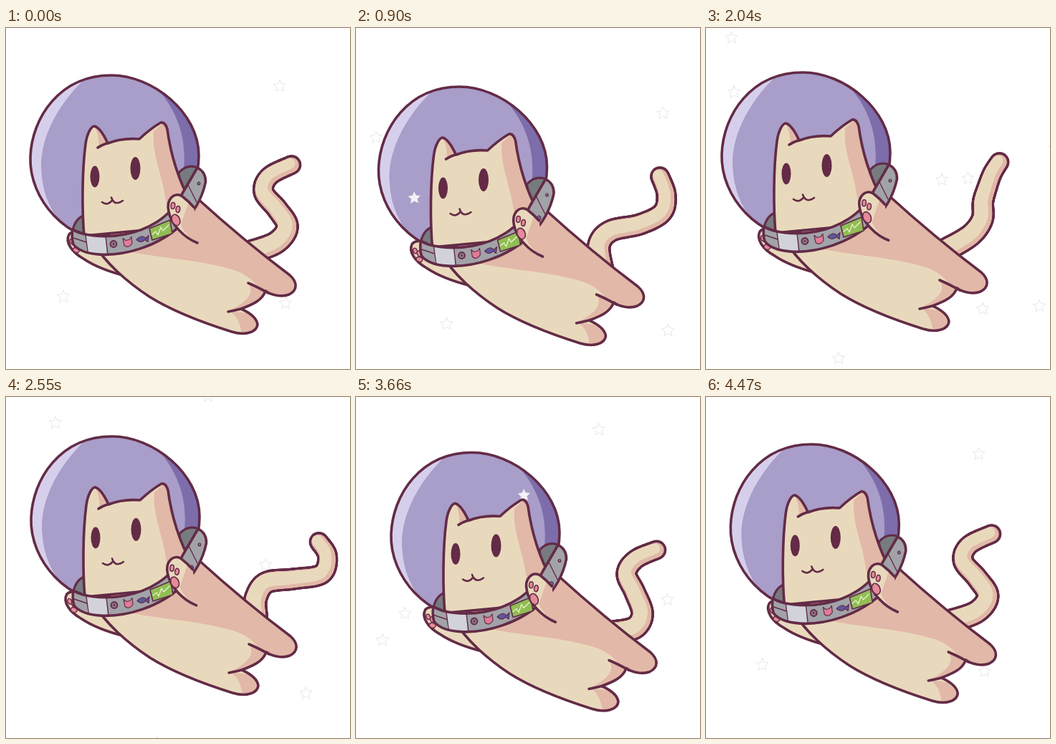
Animation of 480 by 476 pixels, one loop 4500 ms. Source, as an HTML page with a canvas:

```html
<!DOCTYPE html>
<html lang="en">
<head>
<meta charset="utf-8">
<title>Space cat</title>
<style>
html, body { margin: 0; width: 100%; height: 100%; overflow: hidden; background: #fff; }
canvas { display: block; }
</style>
</head>
<body>
<canvas id="stage" width="480" height="476"></canvas>
<script>
const ctx = document.getElementById('stage').getContext('2d');
const LOOP = 4.5;
const INK = '#632b46', CREAM = '#e9d9bc', PINK = '#e2b8a8', PAD = '#e58b9a';

// Poses: time, drift x, drift y, paw swing, then the tail's spine from root to tip.
const POSES = [
  [0, 0, 0, 0, 340, 312, 376, 298, 391, 276, 377, 252, 358, 228, 366, 206, 397, 190],
  [0.9, -2.5, 16, 1, 344, 320, 340, 286, 357, 266, 397, 257, 428, 241, 434, 216, 425, 190],
  [1.32, -7.5, 19.5, 1, 342, 321, 372, 291, 392, 264, 404, 232, 410, 211, 415, 193, 419, 181],
  [2.04, -12, -4, 0.1, 347, 312, 380, 292, 396, 270, 397, 246, 402, 228, 410, 206, 420, 190],
  [2.55, 1, -11, 0.6, 346, 316, 346, 291, 361, 269, 399, 264, 438, 257, 446, 232, 434, 212],
  [3.66, 15, 11.5, 0.9, 345, 316, 373, 309, 383, 289, 372, 259, 361, 234, 374, 214, 403, 201]
];

// Stars drift in depth layers; each has a position at a moment.
const SLOW = [51.5, 42.3], MID = [65.2, 44], FAST = [346, 240];
const STARS = [
  { x: 382, y: 81, at: 0, v: SLOW },
  { x: 80, y: 375, at: 0, v: SLOW },
  { x: 390, y: 384, at: 0, v: [50.4, 42.3] },
  { x: 196, y: 122, at: 0, v: MID },
  { x: 386, y: 392, at: 2.04, v: [63.5, 42.4] },
  { x: 465, y: 388, at: 2.04, v: FAST },
  { x: 116, y: 37, at: 1.32, v: FAST, front: true },
  { x: 131, y: 96, at: 1.32, v: FAST, front: true },
  { x: 81, y: 237, at: 0.9, v: FAST, front: true },
  { x: 68, y: 302, at: 3.66, v: FAST, front: true },
  { x: 234, y: 137, at: 3.66, v: FAST, front: true }
];

const path = d => new Path2D(d);
const SHAPES = {
  body: path('M122,300 C138,327 168,354 200,375 C235,397 280,413 315,424 C335,430 350,424 351,414 C350,404 339,397 328,392 C344,386 358,380 362,367 C370,373 385,376 395,372 C407,366 407,355 396,345 C360,318 310,277 266,237 L235,235 Z'),
  bodyShade: path('M130,300 C180,321 260,320 315,337 Q338,343 352,362 L366,371 L420,385 L420,300 L260,215Z M338,356 Q352,376 308,396 L328,394 Q360,386 364,366Z M312,395 Q328,405 329,432 L358,428 L350,400Z'),
  creases: path('M366,370 Q350,361 338,356 M328,392 Q320,394 310,396'),
  glass: path('M34,180 C36,125 75,66 147,66 C205,66 269,118 269,178 C269,245 215,299 152,299 C85,299 32,240 34,180Z'),
  head: path('M109,290 C106,255 106,200 111,162 C113,147 119,137 123.5,137 C130,139 137,150 142,161 Q162,153 186,155 Q202,140 216,132 Q222,131 225,141 C229,171 237,205 258,244 L215,280Z'),
  headShade: path('M222,130 L206,144 C203,175 218,205 222,235 Q226,262 235,285 L285,260Z M123,136 Q131,152 129,167 L144,160 L136,136Z'),
  brow: path('M128,167 Q134,163 142,160.5'),
  mouth: path('M134,243 Q142,249 148.5,240 L147,236.5 M148.5,240 Q153,248 163,241'),
  collarBack: path('M93,282 Q97,266 108,262 L110,292Z M241,202 Q253,189 268,195 L262,228 L246,240Z'),
  collar: path('M93,281 C115,297 212,301 246,231 L267,195 Q279,201 278.5,215 C258,313 120,335 94,302 Q91,292 93,281Z'),
  panel: path('M111,280 L139,285 L141,325 L113,320Z'),
  collarLines: path('M111,289 L114,312 M139,291 L142,316 M254,219 L266,243 M94,293 L112,299'),
  screen: path('M200,280 L229,268 L232,287 L204,296Z'),
  trace: path('M204,288 L209,284 L212,289 L216,278 L219,283 L227,275'),
  catIcon: path('M162,293 L166,296 L171,295 L174,291 L175,300 Q170,308 164,303Z'),
  fish: path('M181,295 Q188,287 194,293 L198,289 L197,298 L193,295 Q187,301 181,295Z'),
  farArm: path('M170,347 Q130,337 108,322 C92,313 82,299 88,288 Q96,280 112,290 L168,328'),
  nearArm: path('M267,300 C249,293 230,274 227,256 C223,239 235,228 246,235 Q255,242 262,250'),
  nearArmShade: path('M258,235 Q248,262 244,275 Q250,290 270,302 L280,250Z'),
  glint: path('M120,62 C75,100 49,150 49,192 C50,232 62,258 90,288 L20,300 L20,60Z'),
  glassShade: path('M200,74 C240,110 257,160 245,215 L300,215 L300,74Z')
};

function paint(shape, fill, width = 3.6) {
  if (fill) { ctx.fillStyle = fill; ctx.fill(shape); }
  if (width) { ctx.lineWidth = width; ctx.strokeStyle = INK; ctx.stroke(shape); }
}

function shaded(shape, base, layers) {
  paint(shape, base, 0);
  ctx.save();
  ctx.clip(shape);
  for (const [layer, color] of layers) paint(layer, color, 0);
  ctx.restore();
  paint(shape);
}

function ellipse(x, y, rx, ry, turn = 0) {
  const p = new Path2D();
  p.ellipse(x, y, rx, ry, turn, 0, 7);
  return p;
}

function hermite(a, b, ma, mb, u) {
  const w = 1 - u;
  return a * w * w * (1 + 2 * u) + b * u * u * (3 - 2 * u) + ma * u * w * w - mb * u * u * w;
}

function poseAt(t) {
  const n = POSES.length;
  const key = i => POSES[(i + n) % n];
  const time = i => key(i)[0] + LOOP * Math.floor(i / n);
  let i = n - 1;
  while (POSES[i][0] > t) i--;
  const span = time(i + 1) - time(i);
  const slope = (j, c) => (key(j + 1)[c] - key(j - 1)[c]) / (time(j + 1) - time(j - 1));
  return key(i).map((v, c) =>
    hermite(v, key(i + 1)[c], slope(i, c) * span, slope(i + 1, c) * span, (t - time(i)) / span));
}

function drawTail(spine) {
  const count = spine.length / 2;
  const at = (i, c) => spine[2 * Math.max(0, Math.min(count - 1, i)) + c];
  const dots = [];
  for (let s = 0; s <= 120; s++) {
    const f = s / 120 * (count - 1), i = Math.min(count - 2, Math.floor(f));
    const coord = c => hermite(at(i, c), at(i + 1, c),
      (at(i + 1, c) - at(i - 1, c)) / 2, (at(i + 2, c) - at(i, c)) / 2, f - i);
    dots.push([coord(0) + 1.5, coord(1) + 1, 15.5 - 3.5 * s / 120]);
  }
  const pass = (color, grow, dx, dy) => {
    ctx.fillStyle = color;
    for (const [x, y, r] of dots) {
      ctx.beginPath();
      ctx.arc(x + dx, y + dy, r + grow, 0, 7);
      ctx.fill();
    }
  };
  pass(INK, 1.9, 0, 0);
  pass(PINK, -1.7, 0, 0);
  pass(CREAM, -4.7, -2.4, -1.8);
}

function drawStar(x, y) {
  ctx.beginPath();
  for (let i = 0; i < 10; i++) {
    const r = i % 2 ? 4.3 : 9, a = i * Math.PI / 5 - 1.6;
    ctx.lineTo(x + r * Math.cos(a), y + r * Math.sin(a));
  }
  ctx.closePath();
  ctx.fillStyle = 'rgba(255, 255, 255, 0.88)';
  ctx.fill();
  ctx.lineWidth = 0.9;
  ctx.strokeStyle = 'rgba(215, 212, 220, 0.65)';
  ctx.stroke();
}

function drawStars(t, front) {
  for (const s of STARS) {
    if (!!s.front !== front) continue;
    for (let k = -2; k <= 1; k++) {
      const age = t - s.at + k * LOOP;
      drawStar(s.x + s.v[0] * age, s.y + s.v[1] * age);
    }
  }
}

function drawHelmet() {
  shaded(SHAPES.glass, '#a99dc9',
    [[SHAPES.glint, '#d6cfec'], [SHAPES.glassShade, '#7d6dab']]);
  paint(SHAPES.collarBack, '#777b80', 3);
}

function drawFarArm(swing) {
  ctx.save();
  ctx.translate(-7 * swing, -3 * swing);
  paint(SHAPES.farArm, CREAM);
  paint(ellipse(92, 298, 2.8, 4, -0.4), PAD, 1.4);
  paint(ellipse(98, 302, 3, 4.2, -0.4), PAD, 1.4);
  paint(ellipse(98, 310, 4.5, 3.5, 0.4), PAD, 1.4);
  ctx.restore();
}

function drawCollar() {
  shaded(SHAPES.collar, '#a2a3a9', [[SHAPES.panel, '#d2d3da']]);
  paint(SHAPES.collarLines, null, 1.4);
  ctx.save();
  ctx.translate(1, 0.5);
  paint(ellipse(149, 301, 4.5, 4.5), '#8b7286', 1.8);
  paint(ellipse(149, 301, 1.2, 1.2), INK, 0);
  paint(SHAPES.catIcon, '#df7c97', 1.2);
  paint(SHAPES.fish, '#5d57a0', 1.2);
  ctx.restore();
  paint(SHAPES.screen, '#91bd55', 1.6);
  ctx.strokeStyle = '#e6f5c4';
  ctx.lineWidth = 1.3;
  ctx.stroke(SHAPES.trace);
  paint(ellipse(269, 217, 1.8, 2), '#777b80', 1.2);
  paint(ellipse(257, 250, 3, 4, 0.5), '#6670a5', 1.2);
}

function drawNearArm(swing) {
  ctx.save();
  ctx.translate(-4 * swing, 3 * swing);
  shaded(SHAPES.nearArm, CREAM, [[SHAPES.nearArmShade, PINK]]);
  paint(ellipse(237, 268, 5.5, 8, -0.4), PAD, 1.6);
  paint(ellipse(233, 248, 2.8, 4.5, 0.1), PAD, 1.5);
  paint(ellipse(240, 253, 2.8, 4.5, 0.2), PAD, 1.5);
  ctx.restore();
}

function drawCat() {
  shaded(SHAPES.body, CREAM, [[SHAPES.bodyShade, PINK]]);
  paint(SHAPES.creases);
  shaded(SHAPES.head, CREAM, [[SHAPES.headShade, PINK]]);
  paint(SHAPES.brow);
  paint(ellipse(124, 207.5, 6.5, 15), INK, 0);
  paint(ellipse(180.5, 196, 7, 16), INK, 0);
  paint(SHAPES.mouth, null, 2.6);
}

function draw(t) {
  const [, x, y, swing, ...spine] = poseAt(t);
  ctx.fillStyle = '#fff';
  ctx.fillRect(0, 0, 480, 476);
  ctx.lineCap = ctx.lineJoin = 'round';
  drawStars(t, false);
  ctx.save();
  ctx.translate(x, y);
  drawHelmet();
  ctx.restore();
  drawStars(t, true);
  ctx.save();
  ctx.translate(x, y);
  drawTail(spine);
  drawFarArm(swing);
  drawCat();
  drawCollar();
  drawNearArm(swing);
  ctx.restore();
}

const start = performance.now();
function tick() {
  draw((performance.now() - start) / 1000 % LOOP);
  requestAnimationFrame(tick);
}
tick();
</script>
</body>
</html>
```
